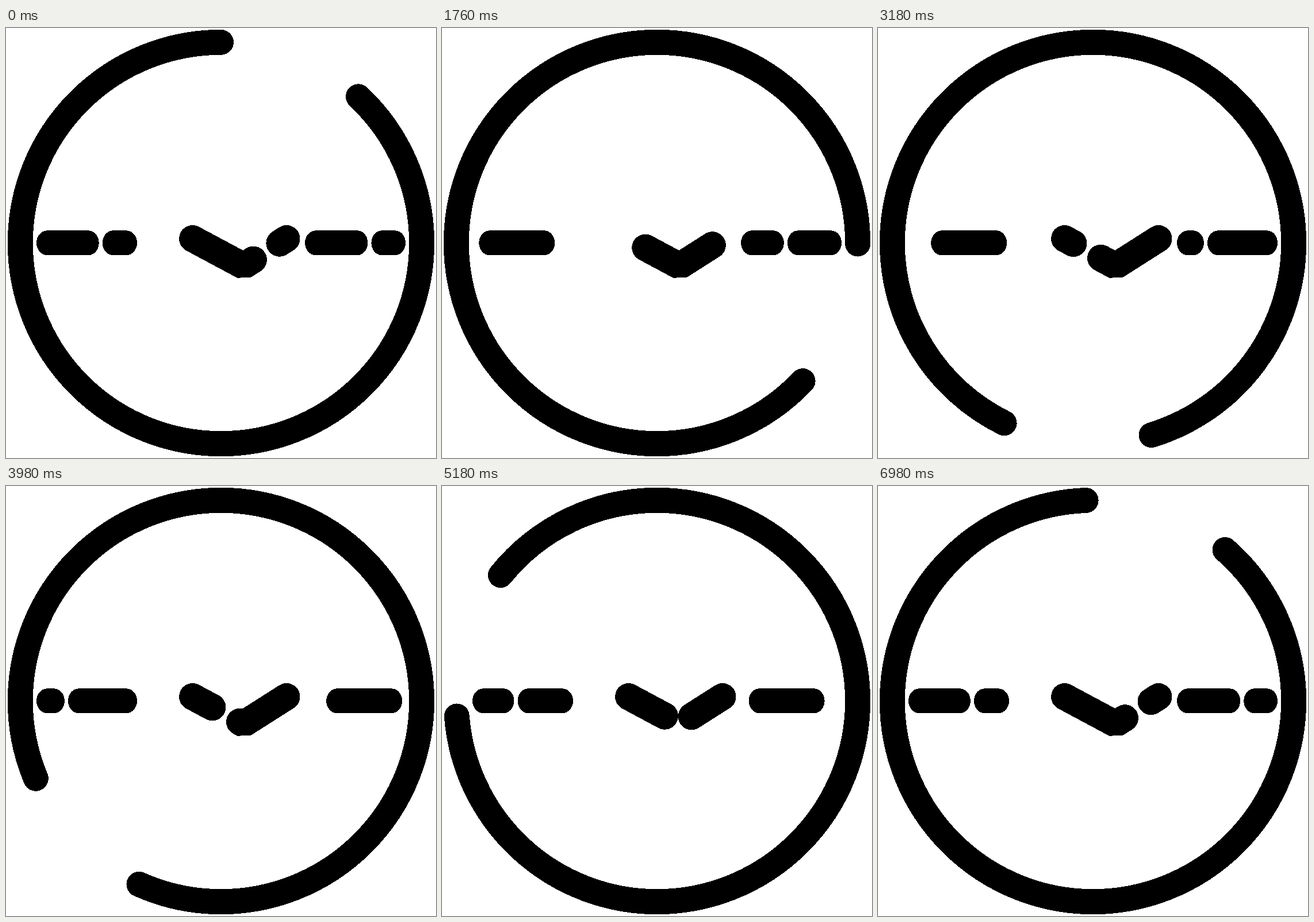
An HTML page that plays this animation: 748x748 px, repeating every 7000 ms.

```html
<!DOCTYPE html>
<html lang="en">
<head>
<meta charset="utf-8">
<title>Clock loop</title>
<style>
  html, body { margin: 0; width: 100%; height: 100%; overflow: hidden; background: #fff; }
  svg { display: block; width: 100vw; height: 100vh; }

  /* Every path measures 351 units; dashes travel one unit per 20 ms step. */
  .dash {
    fill: none;
    stroke: #000;
    stroke-linecap: round;
    stroke-linejoin: bevel;
    shape-rendering: crispEdges;
    stroke-dashoffset: var(--from);
    animation: travel 7s steps(350) infinite;
  }
  .ring  { --from: -42.1px;  --by: -350px; stroke-width: 44; stroke-dasharray: 308.9 42.1; }
  .left  { --from: -291.7px; --by: -350px; }
  .right { --from: -293.3px; --by: 350px; }
  .bar   { stroke-width: 43; stroke-dasharray: 241.6 109.4; }
  .hands { --from: -324.5px; --by: -350px; stroke-width: 47; stroke-dasharray: 250.8 100.2; }

  @keyframes travel {
    from { stroke-dashoffset: var(--from); }
    to   { stroke-dashoffset: calc(var(--from) + var(--by)); }
  }
</style>
</head>
<body>
<svg viewBox="0 0 748 748">
  <circle class="dash ring" cx="374" cy="374" r="349.2" pathLength="351" transform="rotate(-90 374 374)"/>
  <path class="dash bar left" d="M0 0H160.5" pathLength="351" transform="translate(71.5 373.8) scale(.86 1)"/>
  <path class="dash bar right" d="M0 0H160.5" pathLength="351" transform="translate(538.6 373.8) scale(.86 1)"/>
  <path class="dash hands" d="M324.6 366.5L413.3 414L488 366.5" pathLength="351"/>
</svg>
</body>
</html>
```
